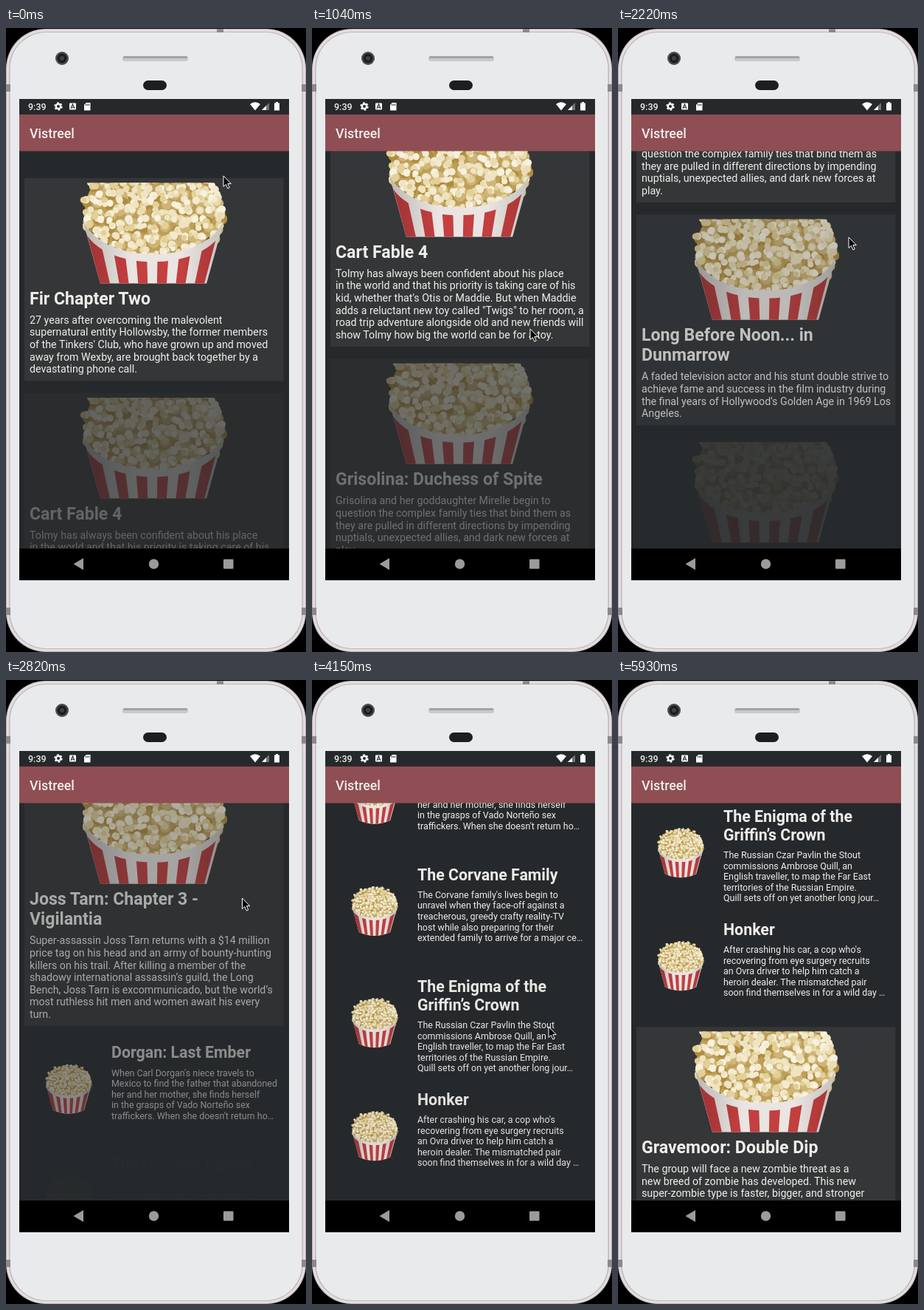
Recreate the animation shown at these times as an HTML page. Size 407x844 px, loop 6680 ms.

```html
<!DOCTYPE html>
<html lang="en">
<head>
<meta charset="utf-8">
<title>Movie list</title>
<style>
html, body { margin: 0; width: 100%; height: 100%; overflow: hidden; background: #000; }
svg { display: block; }
text { font-family: Roboto, sans-serif; fill: #efeeeb; white-space: pre; }
.head { font-size: 23.1px; font-weight: 700; }
.body { font-size: 14.24px; }
.rowHead { font-size: 21.36px; font-weight: 700; }
.rowBody { font-size: 12.46px; }
</style>
</head>
<body>
<svg width="407" height="844" viewBox="0 0 407 844">
  <defs>
    <linearGradient id="shade">
      <stop offset="0" stop-opacity=".2"/>
      <stop offset=".35" stop-opacity="0"/>
      <stop offset=".7" stop-opacity="0"/>
      <stop offset="1" stop-opacity=".16"/>
    </linearGradient>
    <clipPath id="cup"><path d="M5 100C30 160 170 160 195 100L166 196Q100 226 34 196Z"/></clipPath>
    <g id="popcorn"></g>
  </defs>

  <!-- phone -->
  <rect y="1" width="407" height="843" rx="54" fill="#b9b1b4"/>
  <rect x="1" y="2" width="405" height="841" rx="53" fill="#e4dee0"/>
  <rect x="4" y="5" width="399" height="835" rx="50" fill="#bfb8bb"/>
  <rect x="5.5" y="6" width="396" height="833" rx="49" fill="#e9eaec"/>
  <path d="M0 76h6v10h-6zM401 76h6v10h-6zM0 784h6v10h-6zM401 784h6v10h-6zM286 1h9v5h-9z" fill="#8d888a"/>
  <circle cx="76" cy="41" r="9" fill="#4a4b4d"/>
  <circle cx="76" cy="41" r="6.5" fill="#1c1d1f"/>
  <circle cx="76" cy="41" r="3" fill="#39434a"/>
  <rect x="158" y="38" width="89" height="7" rx="3" fill="#c9c9cb"/>
  <rect x="159" y="38" width="87" height="3" rx="1.5" fill="#a3a3a5"/>
  <rect x="186" y="71" width="32" height="13" rx="6.5" fill="#1d1e20"/>
  <rect x="18" y="96" width="366" height="651" fill="#26292b"/>

  <!-- movie list -->
  <svg x="18" y="166" width="366" height="538" viewBox="18 166 366 538"><g id="list"></g></svg>

  <!-- bars -->
  <rect x="18" y="117" width="366" height="49.5" fill="#8f4e54"/>
  <text x="32" y="148.8" font-size="17.8" font-weight="500">Vistreel</text>
  <text x="30" y="110.8" font-size="12.46" font-weight="500">9:39</text>
  <g fill="#fff">
    <circle cx="71" cy="106" r="3.2" fill="none" stroke="#fff" stroke-width="2.4"/>
    <circle cx="71" cy="106" r="4.9" fill="none" stroke="#fff" stroke-width="1.6" stroke-dasharray="2.6 2.53"/>
    <rect x="86" y="101.5" width="9" height="9" rx="1"/>
    <path d="M88 109l2.5-6 2.5 6M89 107.3h3" fill="none" stroke="#26292b" stroke-width="1.1"/>
    <path d="M109 101h5.5v10.5h-8.5v-7.5z"/>
    <path d="M108.5 103v2M110.5 103v2M112.5 103v2" stroke="#26292b"/>
    <path d="M331 103Q338 97.5 345 103L338 111.5Z"/>
    <path d="M357 101v10h-10z" opacity=".35"/>
    <path d="M353 105v6h-6z"/>
    <path d="M364 101.5h2v-1.5h3v1.5h2v10h-7z"/>
  </g>
  <rect x="18" y="704" width="366" height="43"/>
  <g fill="#9b9b9b">
    <path d="M91.5 725L105 717v16z"/>
    <circle cx="200.5" cy="725" r="6.7"/>
    <rect x="295" y="718.5" width="13.5" height="13" rx="1"/>
  </g>
  <path id="cursor" d="M0 0V14.5L3.4 11.5 5.8 17 8.2 16 5.8 10.6H10.3Z" stroke="#fff"/>
</svg>

<script>
const $ = id => document.getElementById(id);

// Popcorn tub on a 200 x 212 field: rows of kernels from back to front, then the cup
let seed = 7;
const rnd = () => (seed = seed * 16807 % 2147483647) / 2147483647;
const spread = d => (rnd() * 2 - 1) * d;
const tones = ['#f3ead0', '#e9dcb0', '#f7f1e0', '#e2d096', '#efe4c2'];
const dot = (x, y, r, fill) =>
  `<circle cx="${x.toFixed(1)}" cy="${y.toFixed(1)}" r="${r.toFixed(1)}" fill="${fill}"/>`;
let tub = '<path d="M8 88C0 36 44 12 100 12C156 12 200 36 192 88C170 150 30 150 8 88Z" fill="#bd9f58"/>';
for (let row = 0; row < 12; row++) {
  const y = 10 + row * 11;
  const half = 91 * Math.sqrt(1 - ((y - 76) / 72) ** 2);
  const count = Math.round(half / 7.5);
  for (let i = 0; i <= count; i++) {
    const x = 100 - half + 2 * half * i / count + spread(3), cy = y + spread(4);
    tub += dot(x + 1, cy + 3, 7, rnd() < .4 ? '#b08c3e' : '#cfb577');
    for (let k = 0; k < 3; k++)
      tub += dot(x + spread(5), cy + spread(4), 3 + rnd() * 2.5, tones[Math.floor(rnd() * 5)]);
  }
}
const cupPath = 'd="M4 88C30 150 170 150 196 88L166 196Q100 226 34 196Z"';
tub += `<path ${cupPath} fill="#eae5e2"/><g clip-path="url(#cup)" fill="#c43f40">`;
for (let i = 0; i < 6; i++) {
  const u = (i - 2.5) * .355 - .02, a = u - .09, b = u + .09;
  tub += `<path d="M${100 + 98 * a} 80H${100 + 98 * b}L${100 + 58 * b} 226H${100 + 58 * a}Z"/>`;
}
$('popcorn').innerHTML = tub + `</g><path ${cupPath} fill="url(#shade)"/>`;

// Each movie: step at which its fade begins, heading lines, text lines
const firstCards = [
  [-20, 'Fir Chapter Two', `27 years after overcoming the malevolent
supernatural entity Hollowsby, the former members
of the Tinkers' Club, who have grown up and moved
away from Wexby, are brought back together by a
devastating phone call.`],
  [-3.7, 'Cart Fable 4', `Tolmy has always been confident about his place
in the world and that his priority is taking care of his
kid, whether that's Otis or Maddie. But when Maddie
adds a reluctant new toy called "Twigs" to her room, a
road trip adventure alongside old and new friends will
show Tolmy how big the world can be for a toy.`],
  [2.9, 'Grisolina: Duchess of Spite', `Grisolina and her goddaughter Mirelle begin to
question the complex family ties that bind them as
they are pulled in different directions by impending
nuptials, unexpected allies, and dark new forces at
play.`],
  [8.2, 'Long Before Noon... in\nDunmarrow', `A faded television actor and his stunt double strive to
achieve fame and success in the film industry during
the final years of Hollywood's Golden Age in 1969 Los
Angeles.`],
  [13, 'Joss Tarn: Chapter 3 -\nVigilantia', `Super-assassin Joss Tarn returns with a $14 million
price tag on his head and an army of bounty-hunting
killers on his trail. After killing a member of the
shadowy international assassin’s guild, the Long
Bench, Joss Tarn is excommunicado, but the world’s
most ruthless hit men and women await his every
turn.`]
];
const rows = [
  [14, 'Dorgan: Last Ember', `When Carl Dorgan's niece travels to
Mexico to find the father that abandoned
her and her mother, she finds herself
in the grasps of Vado Norteño sex
traffickers. When she doesn't return ho…`, 1771.3],
  [18.5, 'The Corvane Family', `The Corvane family's lives begin to
unravel when they face-off against a
treacherous, greedy crafty reality-TV
host while also preparing for their
extended family to arrive for a major ce…`, 1922.7],
  [19.2, 'The Enigma of the\nGriffin’s Crown', `The Russian Czar Pavlin the Stout
commissions Ambrose Quill, an
English traveller, to map the Far East
territories of the Russian Empire.
Quill sets off on yet another long jour…`, 2073.8],
  [19.6, 'Honker', `After crashing his car, a cop who's
recovering from eye surgery recruits
an Ovra driver to help him catch a
heroin dealer. The mismatched pair
soon find themselves in for a wild day …`, 2226.8]
];
const lastCard = [29, 'Gravemoor: Double Dip', `The group will face a new zombie threat as a
new breed of zombie has developed. This new
super-zombie type is faster, bigger, and stronger
than what has come before.`];

const items = [];
const lines = (text, cls, x, y, step) => text.split('\n').map((s, i) =>
  `<text class="${cls}" x="${x}" y="${(y + i * step).toFixed(2)}">${s}</text>`).join('');

function add(start, markup) {
  const el = document.createElementNS('http://www.w3.org/2000/svg', 'g');
  el.innerHTML = markup;
  $('list').append(el);
  items.push({ el, start });
}

function addCard([start, head, body], top) {
  const first = 196.8 + 27.1 * (head.split('\n').length - 1);
  const height = first + 16.65 * (body.split('\n').length - 1) + 11;
  add(start, `<rect x="25" y="${top}" width="351.5" height="${height}" fill="#343638"/>
    <svg x="100" y="${top + 6.4}" width="200" height="136" viewBox="0 38 200 136"><use href="#popcorn"/></svg>` +
    lines(head, 'head', 32, top + 170.9, 27.1) + lines(body, 'body', 32, top + first, 16.65));
  return top + height + 16.4;
}

function addRow([start, head, body, y]) {
  const first = y + 24.3 + 25 * (head.split('\n').length - 1);
  add(start, `<use href="#popcorn" transform="translate(53 ${y + 8}) scale(.32)"/>` +
    lines(head, 'rowHead', 143, y, 25) + lines(body, 'rowBody', 143, first, 14.6));
}

firstCards.reduce((top, card) => addCard(card, top), 203);
rows.forEach(addRow);
addCard(lastCard, 2351.3);

// Step, scroll offset, cursor x, cursor y
const keys = [
  [0, 0, 295, 200], [2, 10, 297, 430], [4, 230, 296, 250], [6, 345, 296, 330],
  [7, 353.8, 296, 407], [10, 521, 294, 273], [12, 690, 300, 230],
  [15, 839.7, 313, 283], [17, 900, 318, 470], [18.5, 1180, 320, 310],
  [19.5, 1340, 321, 280], [23, 1393.3, 322, 461], [26, 1590, 321, 300],
  [28, 1652.1, 321, 469], [31, 1656, 318, 560], [35, 1840, 316, 390],
  [39, 1882.1, 316, 652], [40, 1882.1, 316, 652]
];
const STEP = 148.25, LOOP = 6680, FADE = 10;

function pose(n) {
  const k = Math.max(1, keys.findIndex(key => key[0] >= n));
  const a = keys[k - 1], b = keys[k], p = (n - a[0]) / (b[0] - a[0]);
  return a.map((v, i) => v + (b[i] - v) * p);
}

function draw(ms) {
  const n = Math.min(40, Math.floor((ms % LOOP + 9) / STEP));
  const [, scroll, x, y] = pose(n);
  $('list').setAttribute('transform', `translate(0 ${-scroll})`);
  for (const { el, start } of items) {
    const p = Math.min(1, Math.max(0, (n - start) / FADE));
    el.setAttribute('opacity', (1 - Math.cos(p * Math.PI)) / 2);
  }
  $('cursor').setAttribute('transform', `translate(${x} ${y})`);
  $('cursor').style.display = n < 40 ? '' : 'none';
}

const began = performance.now();
function tick() {
  draw(performance.now() - began);
  requestAnimationFrame(tick);
}
tick();
</script>
</body>
</html>
```
